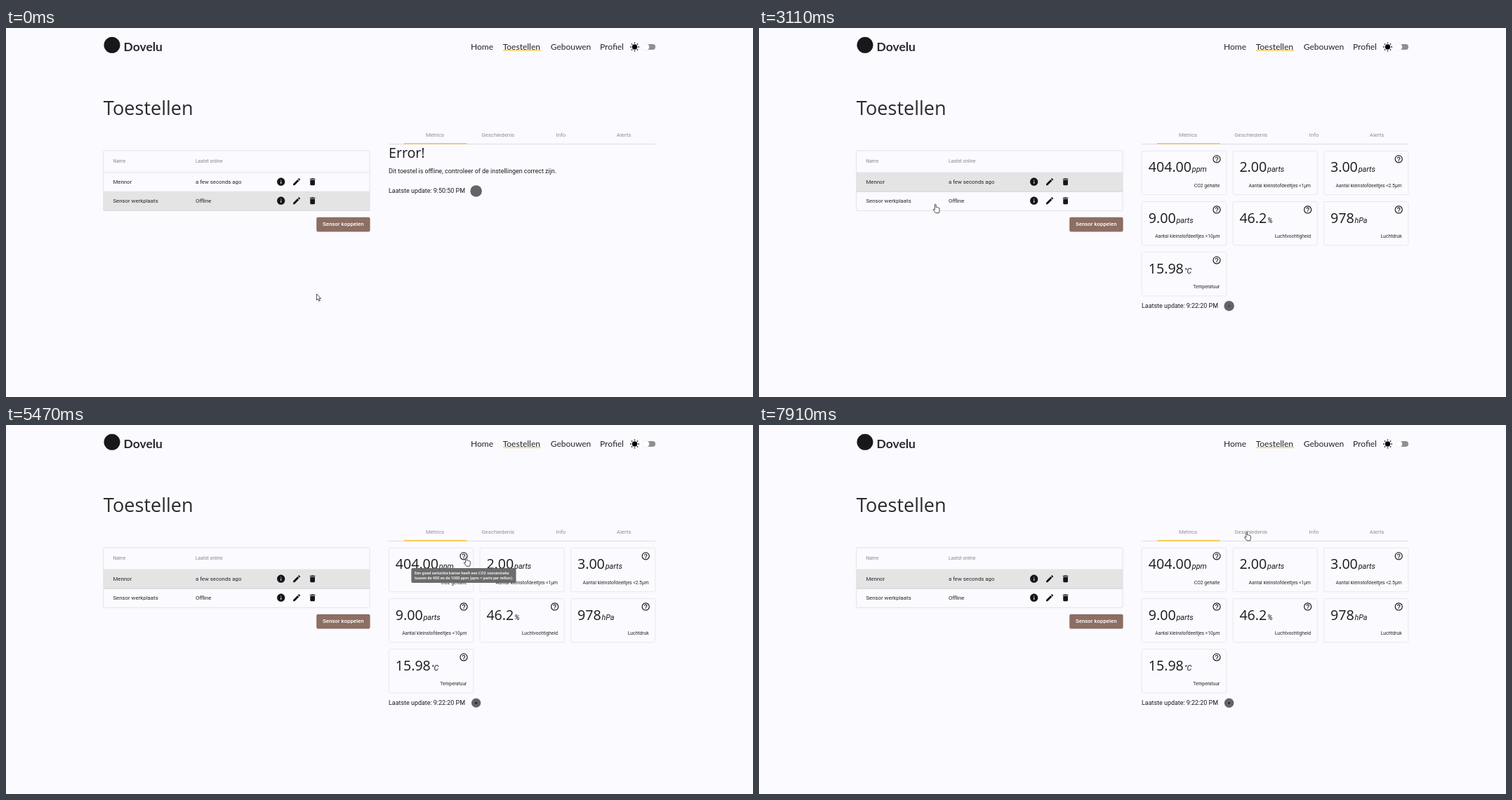
These frames come from a looping animation (1064 px wide and 526 px high, 7.99 s). An HTML page:

```html
<!DOCTYPE html>
<html lang="nl">
<head>
<meta charset="utf-8">
<title>Toestellen</title>
<style>
  html, body { margin: 0; width: 100%; height: 100%; overflow: hidden; background: #fafaff; }
  svg { display: block; width: 100vw; height: 100vh; }
  text { font-family: Roboto, sans-serif; fill: #252528; white-space: pre; }
  .nav { font: 12px Lato, sans-serif; }
  .brand { font: 700 17.5px Lato, sans-serif; fill: #2b2b30; }
  .title { font: 27.1px "Open Sans", sans-serif; fill: #2b2b2e; }
  .value { font: 19.6px "Open Sans", sans-serif; fill: #19191b; }
  .unit { font: italic 10.8px Roboto, sans-serif; }
  .body { font-size: 8.95px; fill: #1c1c1f; }
  .cell { font-size: 7.84px; }
  .tab { font-size: 7.84px; fill: #8e8e93; text-anchor: middle; }
  .head { font-size: 6.72px; fill: #88888d; }
  .label { font-size: 6.72px; text-anchor: end; }
  .button { font-size: 7.84px; font-weight: 500; fill: #fff; text-anchor: middle; }
  .tip { font-size: 5.6px; font-weight: 500; fill: #fff; }
</style>
</head>
<body>
<svg id="stage" viewBox="0 0 1064 526" xmlns="http://www.w3.org/2000/svg">
  <defs>
    <path id="info" d="M12 2C6.48 2 2 6.48 2 12s4.48 10 10 10 10-4.48 10-10S17.52 2 12 2zm1 15h-2v-6h2v6zm0-8h-2V7h2v2z"/>
    <path id="edit" d="M3 17.25V21h3.75L17.81 9.94l-3.75-3.75L3 17.25zM20.71 7.04a1 1 0 0 0 0-1.41l-2.34-2.34a1 1 0 0 0-1.41 0l-1.83 1.83 3.75 3.75 1.83-1.83z"/>
    <path id="bin" d="M6 19c0 1.1.9 2 2 2h8c1.1 0 2-.9 2-2V7H6v12zM19 4h-3.5l-1-1h-5l-1 1H5v2h14V4z"/>
    <path id="help" d="M11 18h2v-2h-2v2zm1-16C6.48 2 2 6.48 2 12s4.48 10 10 10 10-4.48 10-10S17.52 2 12 2zm0 18c-4.41 0-8-3.59-8-8s3.59-8 8-8 8 3.59 8 8-3.59 8-8 8zm0-14c-2.21 0-4 1.79-4 4h2c0-1.1.9-2 2-2s2 .9 2 2c0 2-3 1.75-3 5h2c0-2.25 3-2.5 3-5 0-2.21-1.79-4-4-4z"/>
    <filter id="shadow" x="-10%" y="-20%" width="120%" height="150%">
      <feDropShadow dx="0" dy=".8" stdDeviation="0.7" flood-color="#000" flood-opacity=".3"/>
    </filter>
  </defs>

  <rect width="1064" height="526" fill="#fafaff"/>

  <circle cx="151" cy="24.3" r="11.5" fill="#18181a"/>
  <text class="brand" x="167.5" y="33">Dovelu</text>

  <g id="nav"></g>
  <path d="M708 32.1H762" stroke="#f7c64a" stroke-width="1.2"/>
  <g id="sun"><circle cx="895.5" cy="27" r="3.7"/></g>
  <rect x="909" y="23" width="16" height="8" rx="4" fill="#8f8f92"/>
  <circle cx="911" cy="27" r="5" fill="#fdfdff" stroke="#e9e9ed" stroke-width=".6"/>

  <text class="title" x="138.8" y="123.9">Toestellen</text>

  <g id="tabs"><path d="M545 165.5H925" stroke="#dcdce1"/></g>
  <rect x="567" y="164" width="89.5" height="1.5" fill="#fbc634"/>

  <rect id="picked" x="139" width="379" height="27" fill="#e4e4e4"/>
  <path id="pickedEdge" d="M139 0H518" stroke="#cfcfd2"/>
  <path d="M139 206H518M139 233.3H518" stroke="#dedee2" stroke-width=".8"/>
  <rect x="138.7" y="174.8" width="379.4" height="85.7" rx="2" fill="none" stroke="#e0e0e5" stroke-width=".9"/>
  <g id="table"></g>

  <rect x="442.3" y="269.8" width="76.2" height="20.2" rx="2" fill="#8d6e63" filter="url(#shadow)"/>
  <text class="button" x="480.3" y="282.4">Sensor koppelen</text>

  <g id="error">
    <text class="value" x="545" y="185">Error!</text>
    <text class="body" x="545" y="207">Dit toestel is offline, controleer of de instellingen correct zijn.</text>
  </g>
  <g id="cards"></g>

  <g id="status">
    <text class="body" id="update" x="545" y="3.2"></text>
    <g fill="#000" fill-opacity=".6">
      <circle id="outer" cx="669.6" cy="0.2"/>
      <circle id="inner" cx="669.6" cy="0.2"/>
    </g>
  </g>

  <g id="tooltip">
    <rect x="577.3" y="204" width="149.2" height="21" rx="2" fill="#616161" fill-opacity=".93"/>
    <text class="tip" x="582" y="212.7">Een goed verluchte kamer heeft een CO2 concentratie</text>
    <text class="tip" x="582" y="219.8">tussen de 400 en de 1000 ppm (ppm = parts per milion).</text>
  </g>

  <g id="cursor" fill="#fff" stroke="#222" stroke-width=".8" stroke-linejoin="round">
    <path id="arrow" d="M.4 0V9L2.4 7.1 3.8 10.4 5.3 9.7 3.9 6.6H6.5Z"/>
    <path id="hand" transform="translate(-3.5 -.3)" d="M2.6 8.2V1.2a.9.9 0 0 1 1.8 0V4.8q1-.8 1.7.2 1-.6 1.6.4 1.2-.4 1.5.9V9.6L8.4 12.8H3.9L.6 8.6Q0 7.3 1.2 7.2Z"/>
  </g>
</svg>

<script>
const LOOP = 7990;
const $ = id => document.getElementById(id);
const add = (id, markup) => $(id).insertAdjacentHTML("beforeend", markup);
const text = (cls, x, y, str) => `<text class="${cls}" x="${x}" y="${y}">${str}</text>`;
const icon = (name, cx, cy) =>
  `<use href="#${name}" transform="translate(${cx - 6.72} ${cy - 6.72}) scale(.56)" fill="#161618"/>`;

function build() {
  [[662, "Home"], [707.7, "Toestellen"], [775.7, "Gebouwen"], [846, "Profiel"]]
    .forEach(([x, s]) => add("nav", text("nav", x, 31, s)));

  for (let a = 0; a < 360; a += 45)
    add("sun", `<path d="M900.4 27h1.5" stroke="#000" stroke-width="1.3" transform="rotate(${a} 895.5 27)"/>`);

  ["Metrics", "Geschiedenis", "Info", "Alerts"]
    .forEach((s, i) => add("tabs", text("tab", 611 + i * 89.7, 154.5, s)));

  add("table", text("head", 152.4, 192.4, "Name") + text("head", 270, 192.4, "Laatst online"));
  [["Mennor", "a few seconds ago"], ["Sensor werkplaats", "Offline"]].forEach(([name, seen], i) => {
    const y = 219.2 + i * 27;
    add("table", text("cell", 152.4, y + 2.8, name) + text("cell", 270, y + 2.8, seen) +
      icon("info", 391.7, y) + icon("edit", 414.1, y) + icon("bin", 436.6, y));
  });

  [
    ["404.00", "ppm", "CO2 gehalte"],
    ["2.00", "parts", "Aantal kleinstofdeeltjes &lt;1µm"],
    ["3.00", "parts", "Aantal kleinstofdeeltjes &lt;2.5µm"],
    ["9.00", "parts", "Aantal kleinstofdeeltjes &lt;10µm"],
    ["46.2", "%", "Luchtvochtigheid"],
    ["978", "hPa", "Luchtdruk"],
    ["15.98", "°C", "Temperatuur"]
  ].forEach(([value, unit, label], i) => {
    const x = 545.4 + (i % 3) * 129.6, y = 175.4 + Math.floor(i / 3) * 72.1;
    add("cards",
      `<rect x="${x}" y="${y}" width="120.2" height="62.3" rx="2" fill="#fbfbff" stroke="#e6e6eb" stroke-width=".9"/>` +
      text("value", x + 9.4, y + 30, `${value}<tspan class="unit" dx=".8">${unit}</tspan>`) +
      text("label", x + 111, y + 51.3, label) +
      (i === 1 ? "" : icon("help", x + 106.6, y + 11.4)));
  });
}

// Pointer track: time, x, y of the hot spot
const track = [
  [0, 442, 379], [1000, 442, 379], [1580, 422.7, 372.6], [1760, 354.5, 340],
  [2050, 305, 280], [2350, 272, 230], [2620, 260, 222], [2850, 254, 226],
  [3110, 251, 250.8], [3280, 300, 325], [3500, 416.5, 396], [3720, 480, 372],
  [4050, 585, 280], [4320, 640, 214], [4560, 648.6, 191], [4800, 655.5, 188.8],
  [5470, 655.5, 188.8], [5900, 652.5, 189.5], [6150, 653, 190], [6620, 698, 190],
  [7060, 699.8, 175.3], [7400, 697, 158], [7580, 694.7, 152.4], [LOOP, 694.7, 152.4]
];
const overLink = [[2130, 3140], [4500, 6230], [7270, LOOP]];

const clamp = v => Math.min(1, Math.max(0, v));
const ease = v => v * v * (3 - 2 * v);
const show = (id, on) => $(id).setAttribute("visibility", on ? "visible" : "hidden");

function pointer(t) {
  const i = track.findIndex(k => k[0] > t);
  const [t0, x0, y0] = track[i - 1], [t1, x1, y1] = track[i];
  const p = (t - t0) / (t1 - t0);
  return [x0 + (x1 - x0) * p, y0 + (y1 - y0) * p];
}

function draw(t) {
  const online = t >= 2720;
  const rowTop = t >= 2600 ? 206.2 : 233.4;
  $("picked").setAttribute("y", rowTop);
  $("pickedEdge").setAttribute("transform", `translate(0 ${rowTop + 27})`);
  show("error", !online);
  show("cards", online);
  $("update").textContent = `Laatste update: ${online ? "9:22:20" : "9:50:50"} PM`;
  $("status").setAttribute("transform", `translate(0 ${online ? 396 : 232.2})`);

  // Two discs trade size, one growing while the other shrinks
  const u = t / 950 - 0.05;
  const d = Math.abs(u - Math.round(u));
  $("outer").setAttribute("r", 8.3 * ease(1 - d));
  $("inner").setAttribute("r", 8.3 * ease(d));

  $("tooltip").setAttribute("opacity", clamp((t - 4880) / 150) * clamp((6450 - t) / 120));

  const [x, y] = pointer(t);
  const hand = overLink.some(([from, to]) => t >= from && t < to);
  $("cursor").setAttribute("transform", `translate(${x} ${y})`);
  show("hand", hand);
  show("arrow", !hand);
}

function tick() {
  draw(performance.now() % LOOP);
  requestAnimationFrame(tick);
}

build();
tick();
</script>
</body>
</html>
```
